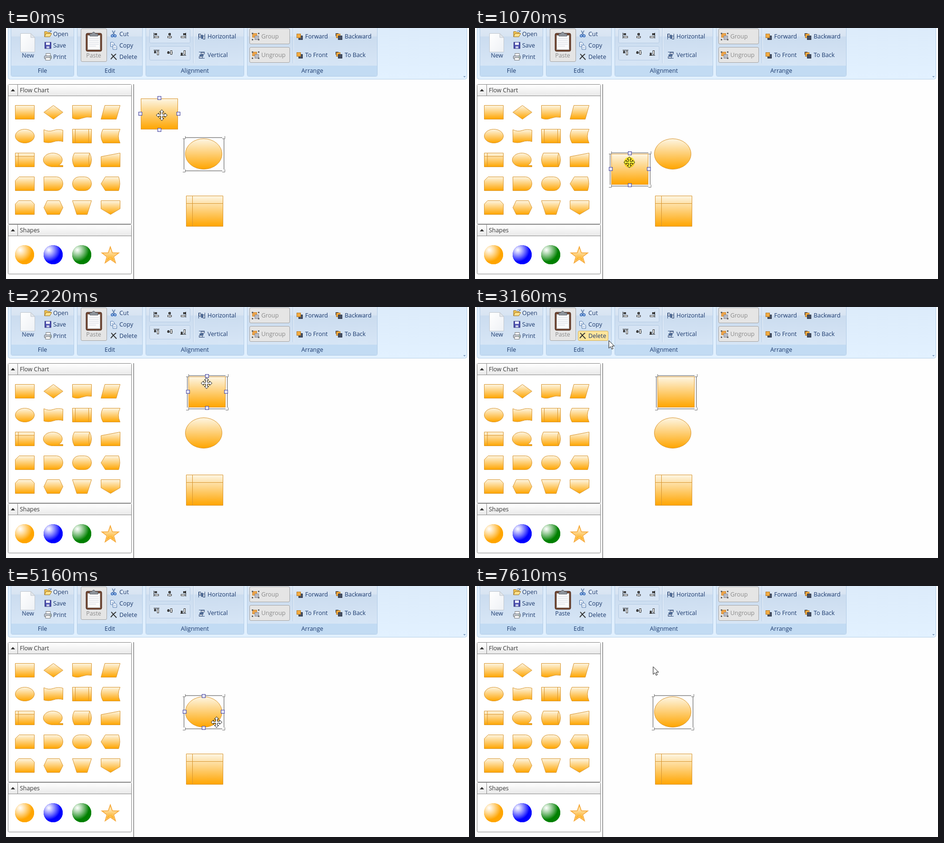
Write an HTML page that moves like this. It is 972x527 px and loops after 8000 ms.

```html
<!DOCTYPE html>
<html>
<head>
<meta charset="utf-8">
<style>
html, body { margin: 0; width: 100%; height: 100%; overflow: hidden; background: #fefefe; }
svg { display: block; }
text { font: 12.4px "Open Sans", "Noto Sans", sans-serif; fill: #1c3a6e; }
.off text { fill: #8b8b8b; }
.shape { fill: url(#amber); stroke: #d9962f; }
.shape .open { fill: none; }
.port { fill: #e4e4fa; stroke: #46469c; }
.back { fill: none; }
.off > .back { fill: #e5e5e5; stroke: #a5a5a5; }
.hot > .back { fill: #ffe59b; stroke: #d3b25c; }
</style>
</head>
<body>
<svg id="stage" width="972" height="527" viewBox="0 0 972 527">
<defs>
<linearGradient id="amber" x2="0" y2="1"><stop stop-color="#fdf6e4"/><stop offset="1" stop-color="#ffa500"/></linearGradient>
<linearGradient id="ribbon" x2="0" y2="1"><stop stop-color="#dcebfa"/><stop offset="1" stop-color="#e2f1ff"/></linearGradient>
<linearGradient id="group" x2="0" y2="1"><stop stop-color="#dfe9f5"/><stop offset=".22" stop-color="#d8e4f2"/><stop offset=".23" stop-color="#cbdcef"/><stop offset="1" stop-color="#dbe9f8"/></linearGradient>
<linearGradient id="head" x2="0" y2="1"><stop stop-color="#fff"/><stop offset="1" stop-color="#e9e9e9"/></linearGradient>
<linearGradient id="paper" x2="1" y2="1"><stop stop-color="#fff"/><stop offset="1" stop-color="#eef1f5"/></linearGradient>
</defs>
</svg>
<script>
const stage = document.getElementById('stage');
const LOOP = 8000;

// --- markup helpers ---
const path = (d, fill = 'none', stroke = 'none', width = 1) =>
  `<path d="${d}" fill="${fill}" stroke="${stroke}" stroke-width="${width}"/>`;
const box = (x, y, w, h, fill = 'none', stroke = 'none', r = 0) =>
  `<rect x="${x}" y="${y}" width="${w}" height="${h}" rx="${r}" fill="${fill}" stroke="${stroke}"/>`;
const text = (x, y, label, extra = '') => `<text x="${x}" y="${y}" ${extra}>${label}</text>`;
const at = (x, y, content, extra = '') => `<g transform="translate(${x} ${y})" ${extra}>${content}</g>`;
const back = (x, y, w, h) => `<rect class="back" x="${x}" y="${y}" width="${w}" height="${h}" rx="2.5"/>`;

// --- toolbar icons, drawn around their centre ---
const icons = {
  open: path('M-7 6V-5H-2L0-3H5V0', '#f3c551', '#9c7424') + path('M-7 6-4-1H8L4 6Z', '#ffe08a', '#9c7424') + path('M0-5Q4-9 7-5M7-8V-5H4', 'none', '#3d69a8'),
  save: box(-6.5, -6.5, 13, 13, '#4b4fae', '#30327e') + box(-4, -6, 8, 5, '#f4f6ff') + box(-3, 2, 6, 4, '#cfd3ea'),
  print: box(-4, -7, 9, 6, '#fff', '#777') + box(-7.5, -2, 15, 6, '#c7ccd4', '#626975', 1) + box(-5, 2, 10, 5, '#fff', '#777') + box(4, 0, 2, 1, '#4a9b44'),
  cut: path('M-3-7 2 2M3-7-2 2', 'none', '#6683ad', 1.6) + '<g fill="none" stroke="#2560b8" stroke-width="1.6"><circle cx="-3" cy="4" r="2.2"/><circle cx="3" cy="4" r="2.2"/></g>',
  copy: [-6.5, -1.5].map((p, i) => path(`M${p} ${p + i}h5l3 3v6h-8Z`, '#f6faff', '#4d75ab') + path(`M${p + 2} ${p + i + 4}h4m-4 2h4`, 'none', '#8caad0')).join(''),
  erase: path('M-5-6Q0 0 6 6M5-6Q-2-1-6 5', 'none', '#303030', 1.9),
  group: box(-6.5, -6.5, 9, 8, '#eda44a', '#c98732') + box(-1.5, -1.5, 8, 8, '#b8bcc6', '#8c8c96') +
    [[-8, -8], [5, -8], [-8, 5], [5, 5]].map(p => box(...p, 3, 3, '#666')).join(''),
};
const bars = '<g fill="#e9eef6" stroke="#333">' + box(-2.5, -4.5, 5, 3, '#444') + box(-2.5, 1.5, 8, 3, '#fff') + '</g>';
const alignIcon = (kind, turned) => {
  const offset = [0, -1.5, -3][kind], line = [-5.5, 0, 5.5][kind];
  return `<g transform="rotate(${turned ? 90 : 0}) scale(${turned ? '1 -1' : '1 1'})">` +
    path(`M${line}-6V6`, 'none', '#222') +
    box(kind === 1 ? -2.5 : kind ? 0.5 : -3.5, -4.5, 4, 3, '#555', '#222') +
    box(kind === 1 ? -4.5 : -3.5 + offset / 3, 1.5, 8, 3, '#fff', '#333') + '</g>';
};
const spreadIcon = turned => `<g transform="rotate(${turned ? 90 : 0})">` +
  path('M-6.5-6V6M6.5-6V6', 'none', '#35507c') + box(-5.5, -5.5, 3, 7, '#fff', '#35507c') +
  box(-1, -3, 3, 7, '#55719d', '#35507c') + box(3, -1.5, 3, 7, '#fff', '#35507c') + '</g>';
const stackIcon = (orangeOnTop, many) => {
  const dark = box(-1.5, -1.5, 8, 8, '#465064', '#2f3747');
  const orange = box(-5.5, -5.5, 8, 8, '#f2ac45', '#b77a22');
  const extra = many ? box(-6.5, -6.5, 5, 5, '#667690', '#2f3747') : '';
  return extra + (orangeOnTop ? dark + orange : orange + dark);
};
const tool = (x, y, icon, label) => at(x, y, icon) + text(x + 12, y + 4, label);

// --- ribbon ---
const ribbonGroup = (x, right, label) =>
  box(x + .5, -6.5, right - x - 1, 108, 'url(#group)', '#b3cce6', 3) +
  box(x + 1, 79, right - x - 2, 22, '#c2dbf3') +
  text((x + right) / 2, 94, label, 'text-anchor="middle"');
const separator = x => path(`M${x}.5 0V74`, 'none', '#b1c8e2') + path(`M${x + 1}.5 0V74`, 'none', '#f2f7fd');

const paste = `<g id="paste">${back(157.5, 1.5, 54, 69)}` +
  box(168, 11, 33, 38, '#70452f', '#4c2d20', 3) + box(171.5, 15.5, 26, 30, '#fbfbfb', '#aaa') +
  path('M174 22h21m-21 4h21m-21 4h21m-21 4h21m-21 4h15', 'none', '#d2d7df') +
  path('M176 17V12H180Q184 5 188 12H193V17Z', '#8f959c', '#555b63') + text(184, 62, 'Paste', 'text-anchor="middle"') + '</g>';

const editTools = [['cut', 'Cut'], ['copy', 'Copy'], ['erase', 'Delete']].map(([icon, label], i) =>
  `<g class="edit">${back(216.5, 2.5 + 24 * i, 63, 20)}${at(226, 12.5 + 24 * i, icons[icon])}${text(238, 17 + 24 * i, label)}</g>`).join('');

const ribbon = box(4.5, -8.5, 963, 116, 'url(#ribbon)', '#b5d0e8', 4) +
  ribbonGroup(10, 143, 'File') + ribbonGroup(149, 287, 'Edit') +
  ribbonGroup(293, 500, 'Alignment') + ribbonGroup(506, 780, 'Arrange') +
  path('M30.5 11.5H52L60.5 20V50.5H30.5Z', 'url(#paper)', '#c1c7ce') + path('M52 11.5V20H60.5Z', '#e3e7ec', '#c1c7ce') +
  text(46, 62, 'New', 'text-anchor="middle"') +
  ['open', 'save', 'print'].map((id, i) => at(88, 12.5 + 24 * i, icons[id]) + text(99, 17 + 24 * i, id[0].toUpperCase() + id.slice(1))).join('') +
  paste + editTools +
  [0, 1].map(row => box(301.5, 2.5 + 36 * row, 85, 29, '#d6e4f4', '#b4cae3', 2) +
    [0, 1, 2].map(k => at(316 + 28 * k, 16 + 36 * row, alignIcon(k, row))).join('')).join('') +
  separator(393) + tool(411, 18, spreadIcon(false), 'Horizontal') + tool(411, 57, spreadIcon(true), 'Vertical') +
  ['Group', 'Ungroup'].map((label, i) =>
    `<g class="off">${back(511.5, 1.5 + 39 * i, 84, 32)}${tool(524, 18 + 39 * i, icons.group, label)}</g>`).join('') +
  separator(602) +
  tool(616, 18, stackIcon(true), 'Forward') + tool(699, 18, stackIcon(false, true), 'Backward') +
  tool(616, 57, stackIcon(true), 'To Front') + tool(699, 57, stackIcon(false, true), 'To Back') +
  path('M960 101h5l-2.5 3Z', '#7f9dc0');

// --- shape palette, each outline in a 40 x 29 cell; the second path is left open ---
const outlines = [
  ['M0 0H40V29H0Z'], ['M20 0 40 14.5 20 29 0 14.5Z'], ['M0 0H40V25Q30 23 20 27T0 27Z'], ['M8 0H40L32 29H0Z'],
  ['M0 14.5a20 14.5 0 0 1 40 0a20 14.5 0 0 1-40 0'], ['M0 1Q10 6 20 2.5T40 2V26Q30 23 20 26.5T0 27Z'],
  ['M0 0H40V29H0Z', 'M6 0V29M34 0V29'], ['M4 0H40Q33 14.5 40 29H4Q-4 14.5 4 0Z'],
  ['M0 0H40V29H0Z', 'M6.5 0V29M0 7.2H40'], ['M31 26H40V29H20A20 14.5 0 1 1 31 26Z'],
  ['M4 0H36Q44 14.5 36 29H4Q-4 14.5 4 0Z', 'M36 0Q32 14.5 36 29'], ['M0 7.5 40 0V29H0Z'],
  ['M8 0H40V29H0V8Z'], ['M0 0H27A13 14.5 0 0 1 27 29H0Z'],
  ['M14 0H26A14 14.5 0 0 1 26 29H14A14 14.5 0 0 1 14 0Z'], ['M9 0H37Q42 14.5 37 29H9L0 14.5Z'],
  ['M7 0H33L40 7V29H0V7Z'], ['M7 0H33L40 14.5 33 29H7L0 14.5Z'], ['M0 0H40L31 29H9Z'], ['M0 0H40V17L20 29 0 17Z'],
];
const palette = outlines.map(([outline, inner], i) =>
  at(19.5 + i % 4 * 60, 162.5 + Math.floor(i / 4) * 50,
    `<path d="${outline}"/>` + (inner ? `<path class="open" d="${inner}"/>` : ''), 'class="shape"')).join('');

const panel = (y, bottom, title) =>
  box(4.5, y + .5, 259, bottom - y, '#fff', '#858585', 2) +
  box(5, y + 1, 258, 23, 'url(#head)') + path(`M5 ${y + 24.5}H263M24.5 ${y + 1}V${y + 24}`, 'none', '#8a8a8a') +
  path(`M10 ${y + 15}h9l-4.5-5Z`, '#333') + `<g style="filter:grayscale(1)">${text(29, y + 17, title)}</g>`;

const ball = (x, color, id) =>
  `<radialGradient id="${id}" cx=".27" cy=".25" r=".62"><stop stop-color="#fff"/><stop offset=".12" stop-color="#fff" stop-opacity=".9"/><stop offset="1" stop-color="${color}"/></radialGradient>` +
  `<circle cx="${x}" cy="476" r="20" fill="${color}"/><circle cx="${x}" cy="476" r="20" fill="url(#${id})"/>`;
const starPoints = radius => Array.from({ length: 10 }, (_, i) => {
  const r = i % 2 ? radius * .4 : radius, a = i * Math.PI / 5;
  return `${(219 + r * Math.sin(a)).toFixed(1)},${(478 - r * Math.cos(a)).toFixed(1)}`;
}).join(' ');
const star = `<polygon points="${starPoints(21)}" fill="#f6a735"/><polygon points="${starPoints(15)}" fill="url(#amber)" stroke="#ffd68b"/>`;

const sidebar = panel(118, 411, 'Flow Chart') + palette + panel(412, 516, 'Shapes') +
  ball(39, '#ffa500', 'orangeBall') + ball(99, '#0000ff', 'blueBall') + ball(159, '#008000', 'greenBall') + star +
  path('M268 118V527', 'none', '#a0a0a0', 2);

// --- canvas items: 78 x 65, with selection frame and connection ports ---
const corner = (x, y) => box(x - 5, y - 5, 6, 6, '#fefefe') + path(`M${x - 5} ${y + .5}H${x + .5}V${y - 5}`, 'none', '#777');
const frame = '<g class="frame">' + box(-2, -1.5, 84, 69, 'none', '#b9b9b9') + box(-2.5, -2, 84, 70, 'none', '#6f6f6f') +
  corner(0, 0) + corner(83, 0) + corner(0, 70) + corner(83, 70) + '</g>';
const ports = '<g class="ports">' + [[39, -1], [-1, 32], [79, 32], [39, 66]]
  .map(([x, y]) => `<rect class="port" x="${x - 3.5}" y="${y - 3.5}" width="7" height="7"/>`).join('') + '</g>';

stage.innerHTML += ribbon + sidebar +
  at(378.5, 352.5, '<path d="M0 0H77V64H0Z"/><path class="open" d="M13 0V64M0 16H77"/>', 'class="shape"') +
  `<g id="oval" transform="translate(376 232)"><ellipse class="shape" cx="39" cy="32.5" rx="38.5" ry="32"/>${frame}${ports}</g>` +
  `<g id="block"><rect class="shape" x=".5" y=".5" width="77" height="64"/>${frame}${ports}</g>` +
  '<g id="cursor">' +
  '<path id="mover" d="M0-11.5 4.5-6.5H1.8V-1.8H6.5V-4.5L11.5 0 6.5 4.5V1.8H1.8V6.5H4.5L0 11.5-4.5 6.5H-1.8V1.8H-6.5V4.5L-11.5 0-6.5-4.5V-1.8H-1.8V-6.5H-4.5Z" fill="#fff" stroke="#111"/>' +
  '<path id="arrow" d="M0 .5V16.5L3.7 13 6.2 18.5 8.8 17.4 6.4 12H11.5Z" fill="#fff" stroke="#111"/>' +
  '<circle id="press" r="11.3" fill="#f8f53c" style="mix-blend-mode:multiply"/></g>';

// --- motion: [time, x, y] ---
const pointerPath = [
  [0, 327, 183], [70, 327, 183], [150, 321, 164], [250, 321, 164], [840, 323, 279], [1060, 323, 279], [1070, 324, 282],
  [1150, 324, 282], [1230, 329, 305], [1310, 332, 296], [1460, 339, 247], [1520, 339, 247], [1830, 421, 160],
  [2300, 421, 160], [2450, 423, 197], [2600, 423, 197], [2690, 425, 190], [2800, 425, 190], [3160, 281, 70],
  [3650, 281, 70], [3920, 449, 258], [4000, 449, 258], [4110, 460, 303], [4300, 442, 285.5], [7400, 442, 285.5], [7610, 374, 169],
];
const blockPath = [
  [0, 283, 148], [250, 283, 148], [840, 285, 262], [1060, 285, 262], [1070, 286, 264], [1150, 286, 264],
  [1250, 291, 289], [1330, 294, 284], [1460, 297, 248], [1520, 297, 248], [1830, 383, 146],
];
function along(keys, t) {
  const i = keys.findIndex(k => k[0] > t);
  if (i < 0) return keys[keys.length - 1].slice(1);
  const [a, b] = [keys[i - 1], keys[i]], u = (t - a[0]) / (b[0] - a[0]);
  return [1, 2].map(n => Math.round(a[n] + (b[n] - a[n]) * u));
}

const find = selector => stage.querySelector(selector);
const show = (selector, on) => find(selector).style.display = on ? '' : 'none';
const move = (selector, [x, y]) => find(selector).setAttribute('transform', `translate(${x} ${y})`);
const within = (t, from, to) => t >= from && t < to;

function render(t) {
  const pointer = along(pointerPath, t), block = along(blockPath, t);
  const [dx, dy] = [pointer[0] - block[0], pointer[1] - block[1]];
  const deleted = t >= 3460, dragging = within(t, 150, 1900);
  const overBlock = !deleted && (dragging || (dx >= 0 && dx <= 78 && dy >= 0 && dy <= 65));
  const overOval = deleted && Math.hypot((pointer[0] - 415) / 39, (pointer[1] - 264.5) / 32.5) < 1;

  move('#block', block);
  move('#cursor', pointer);
  show('#block', !deleted);
  show('#block .frame', t >= 150);
  show('#block .ports', overBlock);
  show('#oval .frame', t < 150 || t >= 4530);
  show('#oval .ports', overOval);
  show('#mover', overBlock || overOval);
  show('#arrow', !(overBlock || overOval));
  show('#press', dragging || within(t, 3310, 3540) || within(t, 4530, 5160));

  const editOff = within(t, 3460, 4600);
  stage.querySelectorAll('.edit').forEach((button, i) =>
    button.setAttribute('class', 'edit' + (editOff ? ' off' : i === 2 && within(t, 3140, 3460) ? ' hot' : '')));
  find('#paste').setAttribute('class', t < 6990 ? 'off' : '');
}

const start = performance.now();
function tick() {
  render((performance.now() - start) % LOOP);
  requestAnimationFrame(tick);
}
tick();
</script>
</body>
</html>
```
